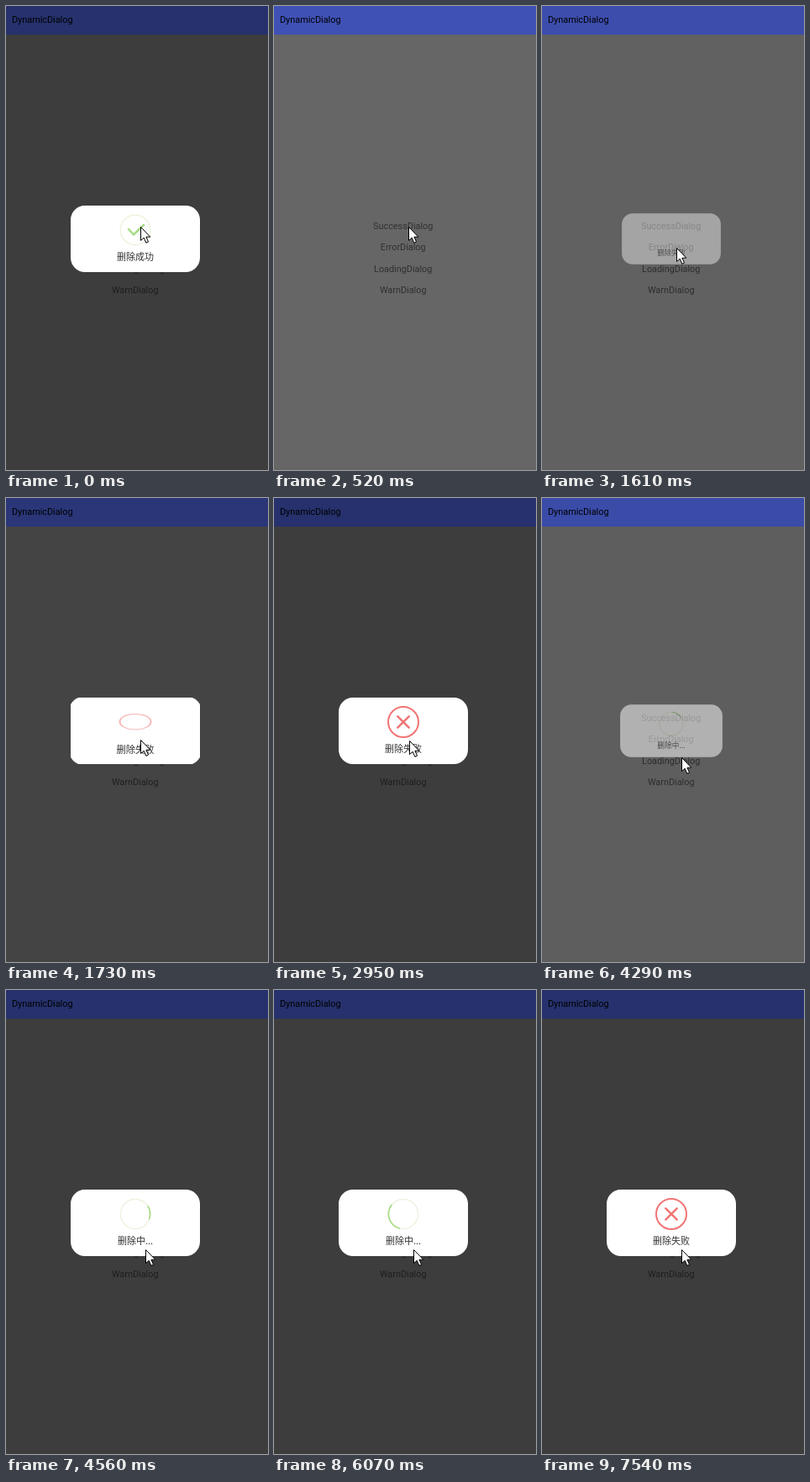
These frames come from a looping animation (312x551 px, 8000 ms). An HTML page with a canvas:

```html
<!DOCTYPE html>
<html>
<head>
<meta charset="utf-8">
<style>
html, body { margin: 0; width: 100%; height: 100%; overflow: hidden; background: #666; }
canvas { display: block; }
</style>
</head>
<body>
<canvas id="stage" width="312" height="551"></canvas>
<script>
const W = 312, H = 551, LOOP = 8000, TAU = Math.PI * 2;
const RED = '#f27474', GREEN = '#a5dc86';
const STEP = 134.6, LEAD = 22;  // the picture refreshes in steps, like a screen recording
const SWAP = 6990;              // loading turns into an error
const BOX = { x: 77, y: 237, w: 154, h: 79 };
const DIALOGS = [
  { open: -1000, close: 150, text: '删除成功', icon: successIcon },
  { open: 1590, close: 3060, text: '删除失败', icon: errorIcon },
  { open: 4272, close: Infinity, text: '删除中...', icon: loadingIcon }
];

const stage = document.getElementById('stage').getContext('2d');
// The dialog has its own layer, which fades as one and clips the overshoot.
const layer = Object.assign(document.createElement('canvas'), { width: BOX.w, height: BOX.h })
  .getContext('2d');

const clamp = v => Math.max(0, Math.min(1, v));
const ease = v => (v = clamp(v)) * v * (3 - 2 * v);

function label(ctx, str, x, y, color, align = 'center', font = '10.85px Roboto, sans-serif') {
  ctx.font = font;
  ctx.textAlign = align;
  ctx.fillStyle = color;
  ctx.fillText(str, x, y);
}

function line(ctx, color, width, points) {
  ctx.strokeStyle = color;
  ctx.lineWidth = width;
  ctx.beginPath();
  points.forEach(([x, y]) => ctx.lineTo(x, y));
  ctx.stroke();
}

function ring(ctx, color, width, r, from = 0, to = TAU) {
  ctx.strokeStyle = color;
  ctx.lineWidth = width;
  ctx.beginPath();
  ctx.arc(0, 0, r, from, to);
  ctx.stroke();
}

function drawPage(dim) {
  stage.fillStyle = '#666';
  stage.fillRect(0, 0, W, H);
  stage.fillStyle = '#3f51b5';
  stage.fillRect(0, 0, W, 34);
  label(stage, 'DynamicDialog', 7, 20, '#000', 'left');
  ['Success', 'Error', 'Loading', 'Warn'].forEach((name, i) =>
    label(stage, name + 'Dialog', 153.7, Math.round(265 + 25.3 * i), '#303030'));
  stage.fillStyle = `rgba(0,0,0,${dim})`;
  stage.fillRect(0, 0, W, H);
}

function successIcon() {
  ring(layer, '#edf4dd', 1.5, 17.8);
  line(layer, GREEN, 2.5, [[-8, -1], [-2, 5.5], [10, -6]]);
}

// The arc turns steadily; its head runs ahead, then its tail catches up.
function loadingIcon(age) {
  const cycle = Math.max(0, (age - 528) / 1060), n = Math.floor(cycle), p = cycle - n;
  const spin = .2 * age - 92;
  const tail = spin + 200 * (n + ease(2 * p - 1));
  const head = spin + 50 + 200 * (n + ease(2 * p));
  ring(layer, '#eff2e0', 1.5, 17.6);
  ring(layer, GREEN, 1.7, 17.6, tail * TAU / 360, head * TAU / 360);
}

// The ring flips up around its horizontal axis, then the cross pops in.
function errorIcon(age) {
  const flip = clamp(age / 400), pop = clamp((age - 200) / 250);
  layer.save();
  layer.globalAlpha = .2 + .8 * flip;
  layer.scale(1, Math.max(.02, Math.cos((1 - flip) * 100 * TAU / 360)));
  ring(layer, RED, 2, 18);
  layer.restore();
  const size = 6.7 * (.4 + .6 * pop + .3 * Math.sin(pop * Math.PI));
  layer.globalAlpha = pop;
  line(layer, RED, 2.5, [[-size, -size], [size, size]]);
  line(layer, RED, 2.5, [[size, -size], [-size, size]]);
}

// Grows past full size, dips below it and settles.
function popScale(age) {
  return .7 + .35 * clamp(age / 135) - .1 * clamp((age - 135) / 105) + .05 * clamp((age - 240) / 60);
}

function drawDialog({ open, close, text, icon }, t) {
  const age = t - open, out = clamp((t - close) / 150);
  const scale = popScale(age) * (1 - .4 * out);
  const failed = icon === loadingIcon && t >= SWAP;
  layer.clearRect(0, 0, BOX.w, BOX.h);
  layer.save();
  layer.translate(BOX.w / 2, BOX.h / 2);
  layer.scale(scale, scale);
  layer.fillStyle = '#fff';
  layer.beginPath();
  layer.roundRect(-BOX.w / 2, -BOX.h / 2, BOX.w, BOX.h, 17);
  layer.fill();
  label(layer, failed ? '删除失败' : text, 0, 25.5, '#333', 'center',
    '11px "Noto Sans CJK SC", "Noto Sans CJK", sans-serif');
  layer.translate(0, -10.5);
  layer.lineCap = 'round';
  if (failed) errorIcon(t - SWAP);
  else icon(age);
  layer.restore();
  stage.globalAlpha = (.2 + .8 * clamp(age / 90)) * (1 - out);
  stage.drawImage(layer.canvas, BOX.x, BOX.y);
  stage.globalAlpha = 1;
}

function drawCursor(t) {
  const x = Math.round(160 + 6 * ease((t - 2670) / 1000));
  const y = Math.round(262 + 25 * ease((t - 540) / 268) + 21 * ease((t - 2880) / 600));
  stage.save();
  stage.translate(x + .5, y + .5);
  stage.beginPath();
  [[0, 0], [0, 16], [3.7, 12.7], [6.3, 18.8], [9, 17.6], [6.4, 11.7], [11.3, 11.7]]
    .forEach(([px, py]) => stage.lineTo(px, py));
  stage.closePath();
  stage.fillStyle = '#fff';
  stage.fill();
  stage.strokeStyle = '#000';
  stage.lineWidth = 1;
  stage.stroke();
  if (t > 2500 && t < 2650) {  // busy ring
    stage.translate(14, 0);
    ring(stage, '#2b9fd0', 3, 6.5);
  }
  stage.restore();
}

function frame() {
  const now = performance.now() % LOOP;
  const t = Math.floor((now + LEAD) / STEP) * STEP;
  const dialog = DIALOGS.filter(d => t >= d.open).pop();
  const fade = 1 - clamp((t - dialog.close - 130) / 220);
  drawPage(Math.min(.4, .0021 * (t - dialog.open)) * fade);
  drawDialog(dialog, t);
  drawCursor(t);
  requestAnimationFrame(frame);
}
frame();
</script>
</body>
</html>
```
